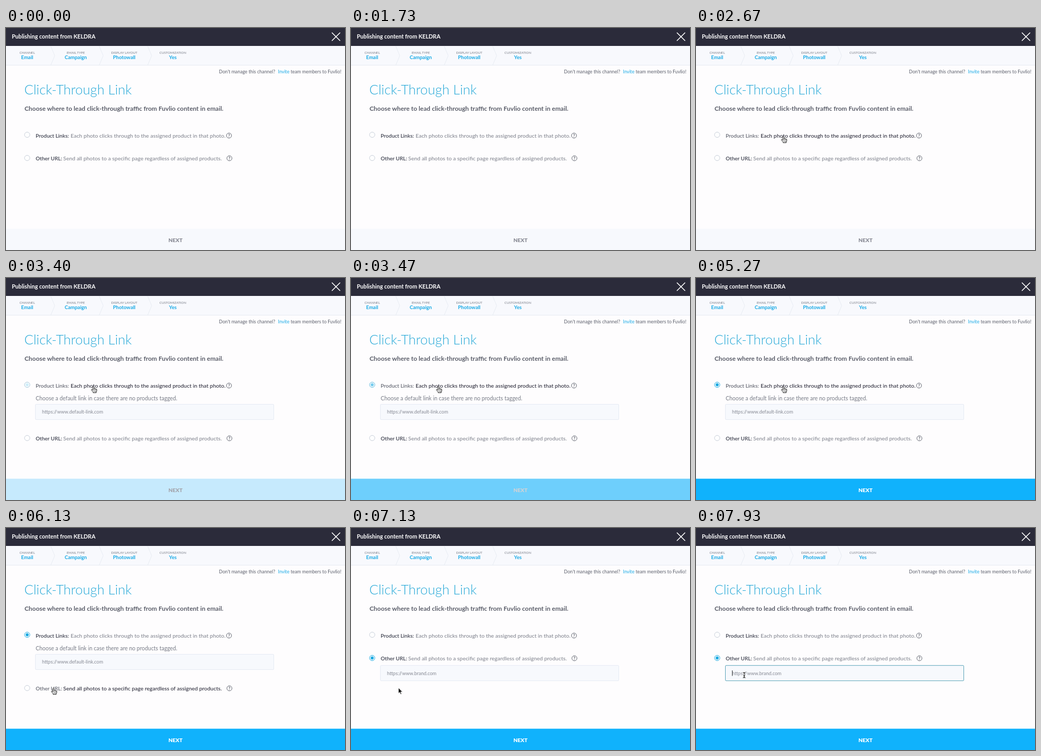
Recreate the animation shown at these times as an HTML page. Size 640 px wide and 421 px high, loop 8 s.

```html
<!DOCTYPE html>
<html lang="en">
<head>
<meta charset="utf-8">
<title>Click-Through Link</title>
<style>
  html, body { margin: 0; width: 100%; height: 100%; overflow: hidden; background: #fefdfe; }
  svg { display: block; width: 100vw; height: 100vh; }
  text { font-family: Lato, "Open Sans", sans-serif; }
  .mid { text-anchor: middle; }
  .title { font-size: 10.7px; font-weight: 700; fill: #fff; }
  .step { font-size: 6.2px; fill: #777b86; }
  .value { font-size: 9.5px; font-weight: 700; fill: #18aae6; }
  .note { font-size: 8.8px; fill: #5b5f6b; }
  .link { fill: #18aae6; }
  .head { font-size: 25.4px; font-weight: 300; fill: #27a9d8; }
  .sub { font-size: 11.9px; font-weight: 700; fill: #5a5d69; }
  .label { font-size: 10px; font-weight: 600; }
  .desc { font-size: 10.4px; font-weight: 500; }
  .hint { font-size: 10.45px; fill: #777b86; }
  .holder { font-size: 9px; fill: #858892; }
  .next { font-size: 10px; font-weight: 900; }
  .help circle { fill: none; stroke: #666a75; }
  .help text { font-size: 8px; font-weight: 700; fill: #555965; }
  .field { fill: #f7f9fd; stroke: #e6ebf4; }
</style>
</head>
<body>
<svg viewBox="0 0 640 421" preserveAspectRatio="none">
  <rect width="640" height="421" fill="#fefdfe"/>
  <rect width="640" height="34" fill="#2b2b3a"/>
  <text class="title" x="11" y="20">Publishing content from KELDRA</text>
  <path d="M615.2 8.7l15.6 15.6m0-15.6l-15.6 15.6" stroke="#fff" stroke-width="1.6"/>
  <rect y="34" width="640" height="36" fill="#f8f9fd"/>
  <path d="M0 70.5h640" stroke="#e6ebf2"/>
  <g id="steps"></g>

  <text class="note" x="402" y="86">Don't manage this channel?</text>
  <text class="note link" x="513.5" y="86">Invite</text>
  <text class="note" x="633" y="86" text-anchor="end">team members to Fuvlio!</text>

  <text class="head" x="34.5" y="126">Click-Through Link</text>
  <text class="sub" x="35" y="156.8">Choose where to lead click-through traffic from Fuvlio content in email.</text>

  <g id="product">
    <circle class="ring" cx="40" cy="202.5" r="5" fill="#fff"/>
    <circle class="dot" cx="40" cy="202.5" r="2.9"/>
    <text class="label" x="56" y="207.8">Product Links:</text>
    <text class="desc" x="122" y="207.8">Each photo clicks through to the assigned product in that photo.</text>
    <g class="help"><circle cx="421" cy="204" r="4.8"/><text class="mid" x="421" y="207">?</text></g>
  </g>
  <g id="productPanel">
    <text class="hint" x="56" y="231.8">Choose a default link in case there are no products tagged.</text>
    <rect class="field" x="55.5" y="239.5" width="450" height="29" rx="1.5"/>
    <text class="holder" x="68" y="257">https://www.default-link.com</text>
  </g>

  <g id="other">
    <circle class="ring" cx="40" cy="246.5" r="5" fill="#fff"/>
    <circle class="dot" cx="40" cy="246.5" r="2.9"/>
    <text class="label" x="56" y="250.6">Other URL:</text>
    <text class="desc" x="108" y="250.6">Send all photos to a specific page regardless of assigned products.</text>
    <g class="help"><circle cx="421.8" cy="247" r="4.8"/><text class="mid" x="421.8" y="250">?</text></g>
  </g>
  <g id="otherPanel">
    <rect id="urlField" class="field" x="55.5" y="260.7" width="450" height="29" rx="1.5"/>
    <text class="holder" x="68" y="278.5">https://www.brand.com</text>
    <path id="caret" d="M68.5 270v10.5" stroke="#333"/>
  </g>

  <rect id="bar" y="380.6" width="640" height="40.4"/>
  <text id="next" class="next mid" x="320" y="406">NEXT</text>

  <g id="hand" stroke-linejoin="round" stroke-linecap="round">
    <path d="M-1.1 1Q0-.7 1.1 1V4.8Q2.2 3.9 3 5.1Q4.2 4.4 4.9 5.6Q6.3 5.2 6.4 6.8V8.8Q6 10.4 5.3 11V12.6H-.6V11.3L-3.6 7.6Q-4.3 6-2.7 6.3L-1.1 7.7Z" fill="#fff" stroke="#111" stroke-width=".9"/>
    <path d="M1.1 5v2.4M3 5.3v2.3M4.9 6v1.8M1 9v2M2.8 9v2M4.5 9v2" fill="none" stroke="#111" stroke-width=".6"/>
  </g>
  <path id="arrow" d="M0 0V10.8L2.5 8.5L4.2 12.4L6 11.6L4.3 7.9H7.8Z" fill="#111" stroke="#fff" stroke-width=".8"/>
  <g id="beam" fill="none">
    <path d="M-2.4-5Q-.4-5 0-4Q.4-5 2.4-5M0-4V4M-2.4 5Q-.4 5 0 4Q.4 5 2.4 5M-1.3 1.4h2.6" stroke="#fff" stroke-width="2.4"/>
    <path d="M-2.4-5Q-.4-5 0-4Q.4-5 2.4-5M0-4V4M-2.4 5Q-.4 5 0 4Q.4 5 2.4 5M-1.3 1.4h2.6" stroke="#111" stroke-width="1.1"/>
  </g>
</svg>
<script>
const LOOP = 8000;
const ENTER = 2330, PICK_PRODUCT = 3370, PICK_OTHER = 6400, FOCUS = 7730;
const MOVE_DOWN = [5400, 6000], MOVE_UP = [7270, 7530];
const LEAVE_PRODUCT = 5530, ENTER_OTHER = 5850;

const $ = id => document.getElementById(id);
const clamp = v => Math.min(1, Math.max(0, v));
const lerp = (a, b, p) => a + (b - a) * p;
const smooth = p => p * p * (3 - 2 * p);
const span = (t, [from, to]) => smooth(clamp((t - from) / (to - from)));
// Quick start, soft finish
const fade = (t, from, ms = 300) => 1 - Math.pow(1 - clamp((t - from) / ms), 2.2);
const mix = (a, b, p) => `rgb(${a.map((v, i) => Math.round(lerp(v, b[i], p)))})`;
const show = (el, on) => el.setAttribute('visibility', on ? 'visible' : 'hidden');
const place = (el, x, y) => el.setAttribute('transform', `translate(${x} ${y})`);

const BLUE = [27, 170, 226], RING = [200, 207, 217], WHITE = [255, 255, 255];
const INK = [62, 65, 79], SOFT_INK = [103, 106, 117];
const GREY = [133, 136, 146], DARK = [43, 43, 58];
const BAR_OFF = [247, 249, 253], BAR_ON = [16, 178, 252], NEXT_OFF = [139, 141, 151];
const LINE = [230, 235, 244], TEAL = [91, 164, 185];

const steps = [
  ['CHANNEL', 'Email', 40], ['EMAIL TYPE', 'Campaign', 131.7],
  ['DISPLAY LAYOUT', 'Photowall', 223.2], ['CUSTOMIZATION', 'Yes', 315]
];
$('steps').innerHTML = steps.map(([name, value, x], i) =>
  `<text class="step mid" x="${x}" y="49">${name}</text>` +
  `<text class="value mid" x="${x}" y="59.3">${value}</text>` +
  (i < 3 ? `<path d="M${84.5 + i * 91.5} 34.5l7.5 18l-7.5 18" fill="none" stroke="#e9edf4"/>` : '')
).join('');

function paintOption(id, chosen, hover) {
  const part = name => $(id).querySelector(name);
  part('.ring').style.stroke = mix(RING, BLUE, chosen);
  part('.dot').style.fill = mix(WHITE, BLUE, chosen);
  part('.label').style.fill = mix(INK, SOFT_INK, hover);
  part('.desc').style.fill = mix(GREY, DARK, hover);
}

function paintCursor(t) {
  const down = span(t, MOVE_DOWN), up = span(t, MOVE_UP);
  const x = lerp(lerp(165, 89.5, down), 91, up);
  const y = lerp(lerp(205, 303, down), 279, up);
  let kind = 'hand';
  if (t >= PICK_OTHER) kind = y < 290 ? 'beam' : 'arrow';
  else if (y > 239 && y < 269) kind = 'beam';
  else if (t >= LEAVE_PRODUCT && t < ENTER_OTHER) kind = 'arrow';
  for (const name of ['hand', 'arrow', 'beam']) {
    show($(name), t >= ENTER && name === kind);
    place($(name), x, y);
  }
}

function draw(t) {
  const product = fade(t, PICK_PRODUCT), other = fade(t, PICK_OTHER);
  const overProduct = fade(t, ENTER) - fade(t, LEAVE_PRODUCT, 200);
  const overOther = fade(t, ENTER_OTHER, 200) - fade(t, PICK_OTHER, 200);
  const productOpen = t >= PICK_PRODUCT && t < PICK_OTHER;

  paintOption('product', product - other, overProduct);
  paintOption('other', other, overOther);
  show($('productPanel'), productOpen);
  place($('other'), 0, productOpen ? 57 : 0);
  show($('otherPanel'), t >= PICK_OTHER);
  show($('caret'), t >= FOCUS);
  $('urlField').style.stroke = mix(LINE, TEAL, fade(t, FOCUS, 150));

  $('bar').style.fill = mix(BAR_OFF, BAR_ON, product);
  $('next').style.fill = mix(NEXT_OFF, WHITE, product);
  paintCursor(t);
}

function tick() {
  draw(performance.now() % LOOP);
  requestAnimationFrame(tick);
}
tick();
</script>
</body>
</html>
```
